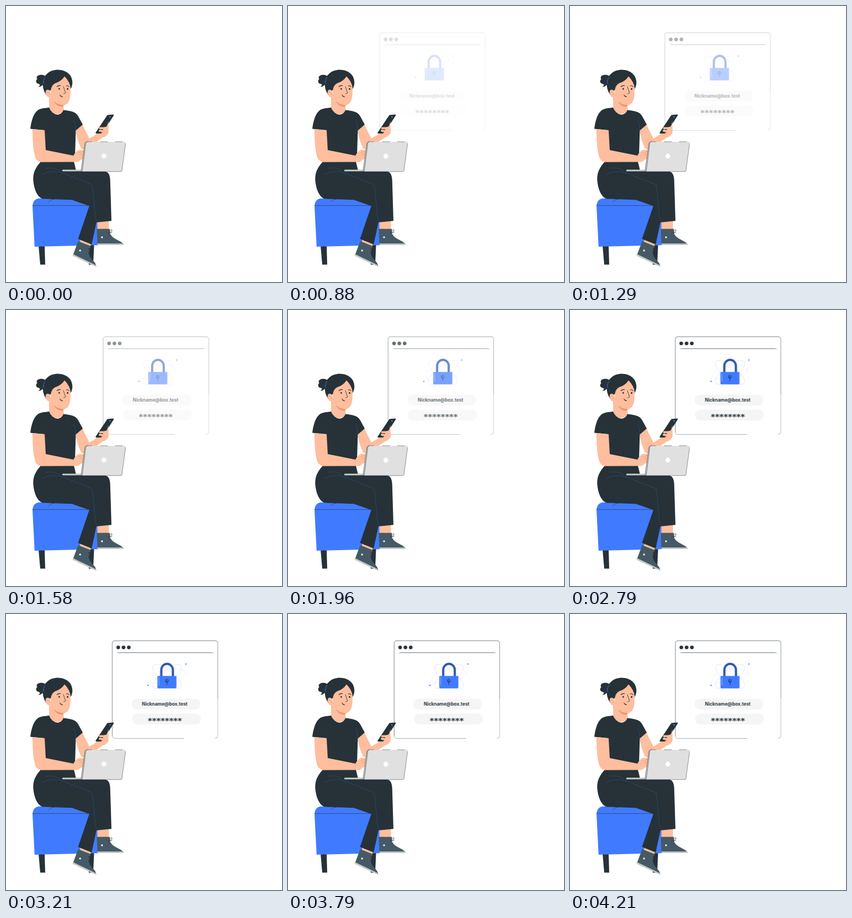
Write an HTML page that moves like this. It is 500 px wide and 500 px high and loops after 4250 ms.

```html
<!DOCTYPE html>
<html lang="en">
<head>
<meta charset="utf-8">
<title>Sign in</title>
<style>
  html, body { margin: 0; width: 100%; height: 100%; overflow: hidden; background: #fff; }
  svg { display: block; width: 100%; height: 100%; }
  #panel { opacity: 0; }
  .dark { fill: #263238; }
  .skin { fill: #ffbe9d; }
  .blue { fill: #407bff; }
  .shoe { fill: #455a64; }
  .sole { fill: #c7c7c7; }
  .line { fill: none; stroke: #263238; stroke-linecap: round; stroke-linejoin: round; }
  .seam { fill: none; stroke: #407bff; stroke-width: .5; opacity: .5; }
  .fold { fill: none; stroke: #e78f67; stroke-width: .6; }
  .finger { fill: none; stroke: #ffbe9d; stroke-width: 3.8; stroke-linecap: round; }
  .mail { font: 700 8.3px Inter, "Open Sans", sans-serif; text-anchor: middle; }
  .pass { font: 700 14.8px "DejaVu Sans", sans-serif; text-anchor: middle; }
</style>
</head>
<body>
<svg viewBox="0 0 500 500">
  <!-- Login window -->
  <g id="panel">
    <path class="line" stroke-width=".65" d="M192.3 220V53.5Q192.3 48.4 197.5 48.4H378.5Q383.6 48.4 383.6 53.5V152"/>
    <path class="line" stroke-width=".4" d="M383.6 152V220Q383.6 224.5 379 225.2M192.3 220Q192.3 225.4 197.5 225.4H322"/>
    <path class="dark" opacity=".7" d="M200 70.5Q202 69.4 206 69.4H371Q375 69.4 377 70.5Z"/>
    <g class="dark">
      <circle cx="203.1" cy="60.6" r="3.3"/>
      <circle cx="212.7" cy="60.6" r="3.3"/>
      <circle cx="222.3" cy="60.6" r="3.3"/>
    </g>
    <g id="orbits" fill="none" stroke="#407bff" stroke-width=".45" opacity=".35"></g>
    <circle class="blue" cx="325.6" cy="90.6" r="1.2"/>
    <circle class="blue" cx="257" cy="129.2" r="1.2"/>
    <path d="M281.1 113V101.5A10.5 11.3 0 0 1 302.1 101.5V113" fill="none" stroke="#2d56b3" stroke-width="4"/>
    <rect class="blue" x="274" y="112.2" width="34.6" height="22.6" rx="2"/>
    <path d="M276.6 115V129" stroke="#a0bdff" stroke-width=".9" stroke-linecap="round"/>
    <circle cx="291.3" cy="121" r="3" fill="#23438b"/>
    <path d="M291.3 121V128" stroke="#23438b" stroke-width="1.3" stroke-linecap="round"/>
    <circle cx="291.8" cy="120.4" r="1.4" fill="#4b7eea"/>
    <rect x="227" y="153.4" width="125" height="19.6" rx="9.8" fill="#f5f5f5"/>
    <rect x="228" y="180.5" width="125" height="19.6" rx="9.8" fill="#f5f5f5"/>
    <text class="mail dark" x="287.3" y="165.8">Nickname@box.test</text>
    <text class="pass dark" x="287.6" y="198">********</text>
  </g>

  <!-- Stool -->
  <path class="dark" d="M59 434H70L71 468.5H62ZM148 432H159.6L158 468.5H150Z"/>
  <path class="blue" d="M48 362Q49 349 61 348.4H154L166 362V433.2L51.8 436Z"/>
  <path class="line" stroke-width=".6" d="M48.5 361.5H150"/>

  <!-- Far arm -->
  <path class="skin" d="M126 224L138 214L151 240L163 233L174 221L185.5 219V230Q183 236 176 238L158 250L145 262L136 258Q129 244 126 224Z"/>

  <!-- Far leg -->
  <path class="skin" d="M165.5 388H186.5V406H165.5Z"/>
  <path class="shoe" d="M164.6 403.7H188L188.5 413Q192 419 202 424Q211 428 213.4 432.5H165.6Z"/>
  <path class="sole" d="M165.6 430.2H211Q213.4 431 213.4 432.9H165.8Z"/>
  <circle cx="174" cy="419" r="1.8" fill="#e8e8e8"/>
  <path class="line" stroke-width=".7" d="M185 411L190 405.5Q193 404.5 192 407.5L186 412L192 410M187 416L190 414.5"/>
  <path class="dark" d="M120 298L179 300C186 300 188.6 307 188.8 317L191 389.3L163.5 392L150 330Z"/>

  <!-- Near leg -->
  <path class="skin" d="M136 419L155 428L152 437L133 430Z"/>
  <path class="shoe" d="M130.8 426L153.6 435L149.8 447Q151 455 158 461.5Q163.4 467 163.4 472L121 452Z"/>
  <path class="sole" d="M122 449.7L162.8 469.5Q164 471 163.4 472.6L120.7 452.4Z"/>
  <circle cx="134.2" cy="443" r="1.8" fill="#e8e8e8"/>
  <path class="line" stroke-width=".7" d="M150 440L156 437Q160 437 157 440L150 441L155 443"/>
  <path class="dark" d="M63 282H123L127 298L157 322L164 391L155.2 432L130.5 422L151 362L120 351.3L66 349.3C55 345 50 328 49.3 314C49 300 55 291 63 282Z"/>
  <path class="line" stroke-width=".6" d="M77 355Q81 350.5 88 350M120 351L151 362"/>
  <path class="seam" d="M66 305Q83 296 104 303L156.5 324L160.5 366Q161.5 380 164 391M72 294Q88 291 98 299"/>

  <!-- Torso and near arm -->
  <path class="skin" d="M78 160V187Q91 203 105 190L102 160Z"/>
  <path class="dark" d="M78 184Q83 196 94 197Q102 195 104 188.5C117 190 126 191 131 200L139 214.8L126.5 225.5L125 272L123 283H64L70 225L44 222.5C46 207 50 194 58 188.5C64 185 71 185 78 184Z"/>
  <path class="seam" d="M123 207Q126.5 214 126 228"/>
  <path class="skin" d="M47.8 223L70 225.2L72 261L122 271Q127 262 133 260.5L142 261L141 275L130 282.5L64 282.8Q56 282 53 274C49 262 48.5 245 47.8 223Z"/>
  <path class="fold" d="M142 263L131 266M141 267L133 270M124 271L122 274"/>

  <!-- Phone and fingers -->
  <path class="dark" d="M183.6 197.6L194 196.6Q196 196.8 195 198.6L175.5 229Q174 231 171.8 231H163Q161.5 230.7 162.6 229Z"/>
  <circle cx="188.4" cy="201" r=".8" fill="#fff"/>
  <path class="seam" d="M194.5 199L174.5 230"/>
  <path class="skin" d="M177 220L183 218L185.6 208.8L185.5 230L178 237.5L172 236Z"/>
  <path class="finger" d="M170.5 221.3L180 221.3M170 226L180 227.5M174 231.5L179 232"/>

  <!-- Head -->
  <g class="dark">
    <ellipse cx="64" cy="130" rx="8.5" ry="5.5"/>
    <ellipse cx="59.5" cy="136.5" rx="5" ry="4.5"/>
    <ellipse cx="65" cy="138" rx="6.5" ry="5.5"/>
    <path d="M68 139Q65 147 58.5 146.5Q63 144 62 139Z"/>
  </g>
  <path class="skin" d="M79 134L104 123L116 136Q118 151 116 167Q113 179 104 180Q94 180 83 171Z"/>
  <path class="fold" d="M87.5 174Q95 180 104 180L103 182Q93 182 87.5 174Z" style="fill:#e78f67"/>
  <path class="dark" d="M77 165Q67 157 66.5 141C67 124 80 115.4 94 115.4C109 116 120.5 124 120.3 139Q120 146 117.2 150Q116 137 106 127.5Q100 136.5 90 139.5Q83 142.5 81.5 151Q80 155 77 157Z"/>
  <path d="M70.5 129Q67 134 67.6 141" fill="none" stroke="#407bff" stroke-width=".8"/>
  <path class="skin" d="M79.5 153Q74 149.5 72 154Q70.8 161 76 165Q80 167 83 164Z"/>
  <path class="fold" d="M74 155Q77 155 78.5 160"/>
  <ellipse class="dark" cx="96.4" cy="150.1" rx="1.4" ry="1.7"/>
  <ellipse class="dark" cx="111.6" cy="150.2" rx="1.4" ry="1.7"/>
  <path class="line" stroke-width="1.2" d="M92.5 146Q95 143.3 98.5 144.3M109.3 144.8Q112 143.8 114 146.2"/>
  <path class="line" stroke-width=".8" d="M104 146L107.8 157.6L104.6 159M97.6 160.5Q98.5 164.5 102.8 164.6"/>
  <path class="dark" d="M98 161.5L102.8 164.6Q99 165.5 98 161.5Z"/>

  <!-- Laptop -->
  <path d="M102.5 296.4H138V299.4H102.5Q101 298 102.5 296.4Z" fill="#c9c9c9"/>
  <path d="M145.5 245.8H148L140 300H137Q135.8 299 136 297L143 248Z" fill="#c4c4c4" stroke="#263238" stroke-width=".5"/>
  <path d="M147.5 246H214.5Q217 246.2 216.7 248.6L210 298Q209.6 300 207.5 300H138.2L144.6 248.5Q145.2 246 147.5 246Z" fill="#e0e0e0"/>
  <path class="line" stroke-width=".5" d="M138.2 299L144.6 248.5Q145.2 245.9 148 245.9H155M171 245.9H184M198 245.9H211M216.7 249L210 298Q209.6 300 207.5 300H128"/>
  <circle cx="177.3" cy="272" r="4.4" fill="#fff"/>
</svg>
<script>
  const loop = 4250;
  const panel = document.getElementById("panel");
  const play = frames => panel.animate(frames, { duration: loop, iterations: Infinity });

  // [time in ms, horizontal shift]
  const slide = [
    [0, -31.2], [540, -31.2], [880, -26.4], [1040, -24.2], [1580, -16.4],
    [2130, -8.6], [2330, -6], [2560, -3.5], [2790, -1.6], [3000, -.4],
    [3250, .3], [3500, .4], [3790, 0], [4000, -.7], [4210, -1.5], [loop, -1.6]
  ];
  play(slide.map(([t, x]) => ({ offset: t / loop, transform: `translateX(${x}px)` })));

  const fade = [[0, 0], [540, 0], [2540, 1], [loop, 1]];
  play(fade.map(([t, opacity]) => ({ offset: t / loop, opacity })));

  // Thin rings around the padlock
  const orbits = document.getElementById("orbits");
  for (const [angle, dash] of [[38, "none"], [-38, "none"], [-12, "2 1.5"]]) {
    const ring = document.createElementNS("http://www.w3.org/2000/svg", "ellipse");
    const attrs = {
      cx: 291.5, cy: 113, rx: 32, ry: 12,
      transform: `rotate(${angle} 291.5 113)`, "stroke-dasharray": dash
    };
    for (const key in attrs) ring.setAttribute(key, attrs[key]);
    orbits.append(ring);
  }
</script>
</body>
</html>
```
